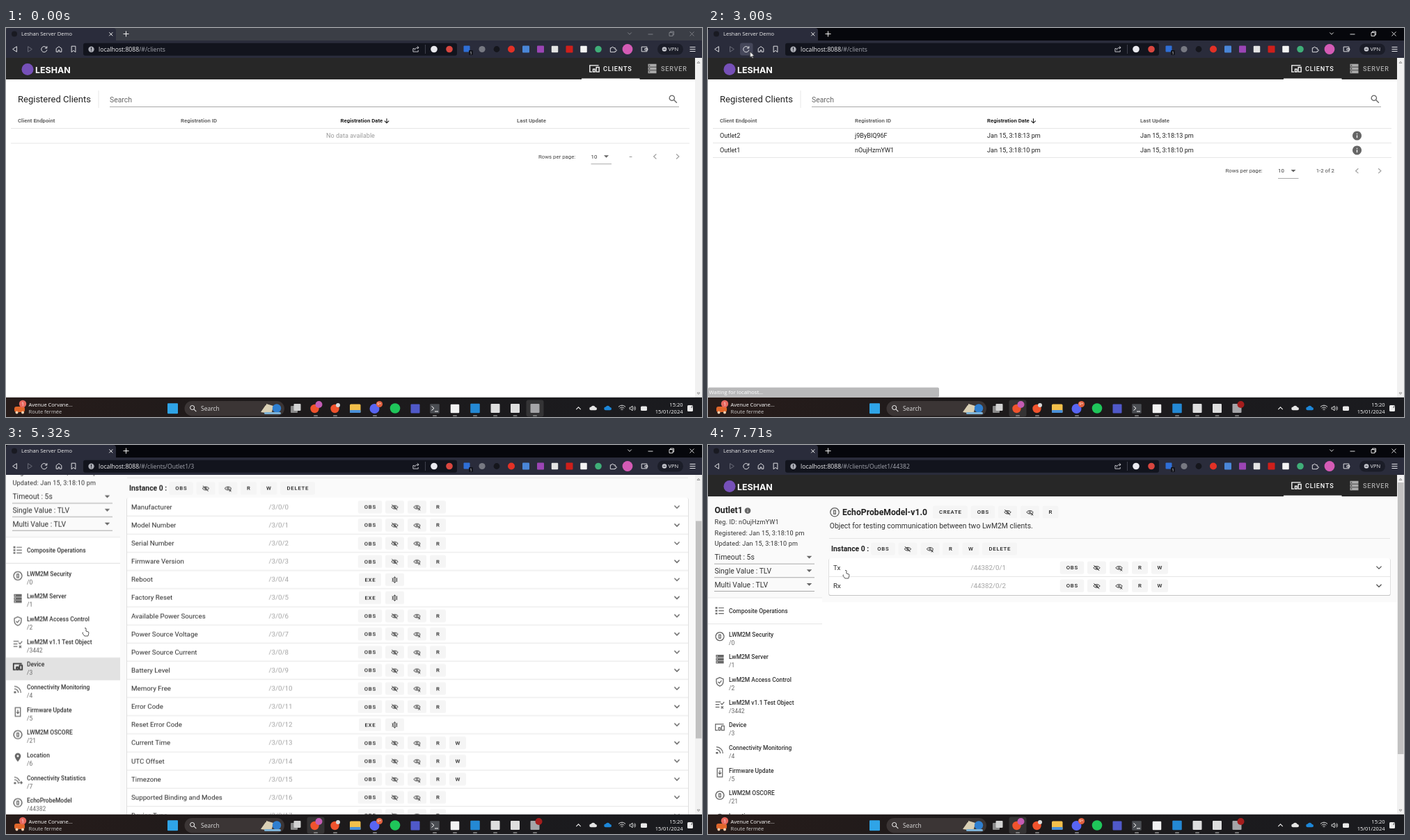
Recreate the animation shown at these times as an HTML page. Size 1000 px wide and 560 px high, loop 8 s.

```html
<!DOCTYPE html>
<html lang="en">
<head>
<meta charset="utf-8">
<title>Server demo</title>
<style>
  html, body { margin: 0; width: 100%; height: 100%; overflow: hidden; background: #fff; }
  svg { display: block; width: 100%; height: 100%; }
  text { white-space: pre; }
</style>
</head>
<body>
<svg id="stage" viewBox="0 0 1000 560">
  <defs>
    <clipPath id="view"><rect y="43" width="990" height="489"/></clipPath>
    <linearGradient id="bar"><stop stop-color="#271c1a"/><stop offset=".4" stop-color="#1d1a1b"/><stop offset="1" stop-color="#1a1b1f"/></linearGradient>
  </defs>
</svg>
<script>
const LOOP = 8000;
const ROBOTO = 'Roboto, sans-serif';
const UI = '"Open Sans", "Noto Sans", sans-serif';
const INK = '#212121', GREY = '#666', PALE = '#a3a3a3', RULE = '#e0e0e0';

let parent = document.getElementById('stage');

// ---- drawing helpers ----
function add(tag, attrs) {
  const node = document.createElementNS('http://www.w3.org/2000/svg', tag);
  for (const key in attrs) node.setAttribute(key, attrs[key]);
  return parent.appendChild(node);
}
function group(draw, attrs = {}) {
  const outer = parent, g = add('g', attrs);
  parent = g;
  draw();
  parent = outer;
  return g;
}
const rect = (x, y, width, height, fill, rx = 0) => add('rect', { x, y, width, height, fill, rx });
const dot = (cx, cy, r, fill) => add('circle', { cx, cy, r, fill });
const square = (x, y, size, fill) => rect(x - size / 2, y - size / 2, size, size, fill, 1);
const hline = (x1, x2, y, fill = RULE) => rect(x1, y - .4, x2 - x1, .8, fill);
const line = (d, stroke, width = 1) =>
  add('path', { d, stroke, fill: 'none', 'stroke-width': width, 'stroke-linejoin': 'round' });

// y is the middle of the capitals
function text(x, y, str, size, fill = INK, { weight = 400, font = ROBOTO, anchor = 'start', spacing = 0 } = {}) {
  const node = add('text', {
    x, y: y + size * .355, fill, 'font-size': size, 'font-family': font,
    'font-weight': weight, 'text-anchor': anchor, 'letter-spacing': spacing
  });
  node.textContent = str;
  return node;
}
const ui = (x, y, str, size, fill = '#fff', more) => text(x, y, str, size, fill, { font: UI, ...more });

const EYE = 'M2 12C5 5.500 19 5.500 22 12 19 18.500 5 18.500 2 12zM12 9.500a2.500 2.500 0 1 0 .01 0';
const STROKED = {
  devices: 'M21 5H2V19H7M9 13h4v6H9zM16 9h6v10h-6z',
  shield: 'M12 2 4 5.500V11c0 5 3.500 9.500 8 11 4.500-1.500 8-6 8-11V5.500zM8 12l3 3 5-6',
  checks: 'M2 6h12M2 12h9M2 18h9M14 9l3 3 5-6M15 16l5 5m0-5-5 5',
  signal: 'M4 5a15 15 0 0 1 15 15M4 11a9 9 0 0 1 9 9M4 18h3v2H4z',
  stats: 'M4 5a15 15 0 0 1 12 9M4 11a9 9 0 0 1 9 9M4 18h3v2H4zM14 18h8m-3-3 3 3-3 3',
  phone: 'M6 2h12v20H6zM12 7v8M8.500 12l3.500 3.500 3.500-3.500',
  zero: 'M12 2.500a9.500 9.500 0 1 0 .01 0M10 8h4v8h-4z',
  list: 'M9 5h13M9 12h13M9 19h13M2 4h3v2H2zM2 11h3v2H2zM2 18h3v2H2z',
  eye: EYE + 'M16 16l6 6m0-6-6 6',
  eyeOff: EYE + 'M3 4l17 17',
  gear: 'M12 5a7 7 0 1 0 .01 0M12 9a3 3 0 1 0 .01 0M12 2v3M12 19v3M3.500 7l2.500 1.500M18 15.500l2.500 1.500M3.500 17l2.500-1.500M18 8.500l2.500-1.500',
  search: 'M9.500 4a5.500 5.500 0 1 0 .01 0M14 14l6 6',
  down: 'M6.500 9l5.500 5.500L17.500 9', left: 'M15 6.500 9 12l6 5.500', right: 'M9 6.500 15 12l-6 5.500', up: 'M6 15l6-6 6 6',
  arrow: 'M12 4v14M5 11.500l7 7 7-7',
  back: 'M17 4v16L5 12z', forward: 'M7 4v16l12-8z',
  reload: 'M19.500 9A8.500 8.500 0 1 0 20 14M20 3v6h-6',
  home: 'M4 10 12 4l8 6v10h-6v-5h-4v5H4z', mark: 'M6 3h12v18l-6-5-6 5z',
  share: 'M8 10H3v10h16v-5M8 15c1-6 5-8 12-8M16 3l5 4-5 4',
  puzzle: 'M4 8h4a3 3 0 1 1 6 0h5v5a3 3 0 1 1 0 5v3H4z', wallet: 'M3 5h16v14H3zM13 10h8v5h-8z',
  wifi: 'M2 9c6-6 14-6 20 0M5.500 13c4-4 9-4 13 0M9 16.500c2-2 4-2 6 0M12 19v1',
  speaker: 'M3 9h4l5-5v16l-5-5H3zM16 8c2 2 2 6 0 8M19 5c4 4 4 10 0 14'
};
const FILLED = {
  server: 'M3 2h18v6H3zM3 9h18v6H3zM3 16h18v6H3zM5 4v2h2V4zM5 11v2h2v-2zM5 18v2h2v-2z',
  pin: 'M12 2a7 7 0 0 0-7 7c0 5 7 13 7 13s7-8 7-13a7 7 0 0 0-7-7m0 4.500a2.500 2.500 0 1 1-.01 0z',
  info: 'M12 2a10 10 0 1 0 .01 0M11 7h2v2h-2zM11 11h2v6h-2z',
  caret: 'M6 9h12l-6 6z',
  cloud: 'M6 19a5 5 0 0 1 0-10 7 7 0 0 1 13 1 4.500 4.500 0 0 1 0 9z'
};
function icon(name, x, y, size, color = GREY, width = 2) {
  const paint = FILLED[name]
    ? { d: FILLED[name], fill: color, 'fill-rule': 'evenodd' }
    : { d: STROKED[name], fill: 'none', stroke: color, 'stroke-width': width };
  const k = size / 24;
  add('path', { ...paint, transform: `translate(${x - size / 2} ${y - size / 2}) scale(${k})` });
}

// ---- timing helpers: keys are [ms, value] ----
function track(node, prop, keys, easing = 'steps(1, end)') {
  const frames = [...keys, [LOOP, keys[keys.length - 1][1]]]
    .map(([t, value]) => ({ offset: t / LOOP, [prop]: value, easing }));
  node.animate(frames, { duration: LOOP, iterations: Infinity });
}
function show(node, from, to = LOOP) {
  const keys = from ? [[0, 0], [from, 1]] : [[0, 1]];
  if (to < LOOP) keys.push([to, 0]);
  track(node, 'opacity', keys);
}
const fade = (node, keys) => track(node, 'opacity', keys, 'linear');

const ACTIVE = 1540, BLANK = 1900, LOADED = 2280, OPEN = 4020, LISTED = 4360, SWITCH = 6080;
const NODE = 'Outlet1', OBJECT = 'EchoProbeModel', OBJECT_ID = '44382';

// ---- page content ----
function header() {
  rect(0, 43, 990, 31, '#272727');
  dot(31, 59.5, 8.5, '#7650b8');
  text(42, 60.3, 'LESHAN', 12.4, '#fff', { weight: 700, font: 'Inter, sans-serif' });
  icon('devices', 845.5, 58.5, 16, '#fff');
  text(858, 58.5, 'CLIENTS', 9.11, '#fff', { weight: 500, spacing: .81 });
  icon('server', 928.5, 58.5, 16, '#aaa');
  text(941, 58.5, 'SERVER', 9.11, '#aaa', { weight: 500, spacing: .81 });
  rect(827, 72.6, 83.5, 1.4, '#fff');
}

function tableHead(cols) {
  ['Client Endpoint', 'Registration ID', 'Registration Date', 'Last Update'].forEach((label, i) =>
    text(cols[i], 133.5, label, 7.81, i === 2 ? INK : GREY, { weight: 700 }));
  icon('arrow', cols[2] + 66.5, 133.8, 11, INK, 2.4);
  hline(7, 982, 144.5);
}
function pager(x, y, range) {
  text(x, y, 'Rows per page:', 7.81, '#444');
  text(x + 75.5, y, '10', 7.81, '#333');
  icon('caret', x + 97.5, y, 14);
  hline(x + 75.5, x + 105, y + 10.8, '#949494');
  text(900, y, range, 7.81, '#444', { anchor: 'end' });
  icon('left', 932.5, y, 15, PALE);
  icon('right', 965, y, 15, PALE);
}
function tablePage() {
  text(17, 102.7, 'Registered Clients', 13.02);
  rect(132.6, 90, .8, 25, RULE);
  text(149, 103, 'Search', 10.42, GREY);
  hline(149, 967, 113.4, '#949494');
  icon('search', 958.5, 102.5, 16);

  show(group(() => {
    tableHead([17, 251, 480.5, 734]);
    text(495, 155, 'No data available', 9.11, '#9b9b9b', { anchor: 'middle' });
    hline(7, 982, 166);
    pager(765, 185, '–');
  }), 0, BLANK);

  show(group(() => {
    show(rect(7, 145, 975, 20.5, '#eee'), 3490, 3560);
    show(rect(7, 166, 975, 20.5, '#eee'), 3560, OPEN);
    const cols = [17, 211, 401, 621];
    tableHead(cols);
    [['Outlet2', 'j9ByBlQ96F', '3:18:13'], [NODE, 'nOujHzmYW1', '3:18:10']].forEach(([name, id, time], i) => {
      const y = 154.6 + i * 21, date = `Jan 15, ${time} pm`;
      [name, id, date, date].forEach((cell, c) => text(cols[c], y, cell, 9.11));
      icon('info', 932.5, y + .4, 15.6);
      hline(7, 982, y + 11);
    });
    pager(743.5, 205.7, '1-2 of 2');
  }), BLANK);

  show(group(() => {
    rect(0, 43, 990, 489, '#fff');
    rect(0, 43, 990, 31, '#272727');
  }), BLANK, LOADED);
}

function button(cx, y, label, width) {
  rect(cx - width / 2, y - 9.1, width, 18.2, '#f5f5f5', 2.6);
  if (STROKED[label]) icon(label, cx, y + .3, 11, INK);
  else text(cx + .35, y, label, 7.81, INK, { weight: 500, spacing: .7, anchor: 'middle' });
}
function buttons(y, labels, centres) {
  const widths = { CREATE: 50, OBS: 34.5, EXE: 32, DELETE: 50, R: 23, W: 24 };
  labels.forEach((label, i) => button(centres[i], y, label, widths[label] || 27));
}
const READ = ['OBS', 'eyeOff', 'eye', 'R'], WRITE = [...READ, 'W'], RUN = ['EXE', 'gear'];
const ROW_X = [523, 558.5, 590.5, 620.5, 649];

function objectPage(symbol, title, about, shift, rows) {
  const pitch = 26.12, top = 163.5, bottom = top + pitch * rows.length;
  rect(164, 74, 826, bottom + 10.5 - 74, '#fafafa');
  icon(symbol, 182, 96.7, 15.6);
  text(193, 96.2, title, 12.19, INK, { weight: 700 });
  buttons(96.5, ['CREATE', ...READ], [289, 336, 371.5, 403.5, 433].map(x => x + shift));
  text(174.8, 116, about, 10.42, '#333');
  hline(174, 980, 134.5);
  text(177, 149.6, 'Instance 0 :', 10.42, INK, { weight: 700 });
  buttons(149.5, [...WRITE, 'DELETE'], [251.5, 287, 319, 348.5, 377.5, 419]);
  rect(173.5, top, 807, bottom - top + 1.2, '#c4c4c4', 2);
  rect(174, top - .4, 806, bottom - top + .6, '#fff', 2);
  rows.forEach(([name, path, labels], i) => {
    const y = top + pitch * (i + .5) - .2;
    if (i) hline(174, 980, top + pitch * i);
    text(180, y, name, 9.766, '#2b2b2b');
    text(377.5, y, path, 9.766, PALE);
    buttons(y + .2, labels, ROW_X);
    icon('down', 964, y + .2, 15.6, '#555');
  });
}

const RESOURCES = ['Manufacturer', 'Model Number', 'Serial Number', 'Firmware Version', 'Reboot', 'Factory Reset',
  'Available Power Sources', 'Power Source Voltage', 'Power Source Current', 'Battery Level', 'Memory Free',
  'Error Code', 'Reset Error Code', 'Current Time', 'UTC Offset', 'Timezone', 'Supported Binding and Modes',
  'Device Type', 'Hardware Version', 'Software Version', 'Battery Status', 'Memory Total', 'ExtDevInfo'];
const deviceRows = RESOURCES.map((name, i) => [name, '/3/0/' + i,
  /^Re|^Factory/.test(name) ? RUN : /Time|UTC/.test(name) ? WRITE : READ]);
const probeRows = ['Tx', 'Rx'].map((name, i) => [name, `/${OBJECT_ID}/0/${i + 1}`, WRITE]);

const OBJECTS = [['LWM2M Security', 0, 'zero'], ['LwM2M Server', 1, 'server'], ['LwM2M Access Control', 2, 'shield'],
  ['LwM2M v1.1 Test Object', 3442, 'checks'], ['Device', 3, 'devices'], ['Connectivity Monitoring', 4, 'signal'],
  ['Firmware Update', 5, 'phone'], ['LWM2M OSCORE', 21, 'zero'], ['Location', 6, 'pin'],
  ['Connectivity Statistics', 7, 'stats'], [OBJECT, OBJECT_ID, 'zero']];

function sidebarTop() {
  rect(0, 74, 164, 146, '#fafafa');
  text(9.4, 93.8, NODE, 12.19, INK, { weight: 700 });
  icon('info', 57, 94.5, 10.4);
  ['Reg. ID: nOujHzmYW1', 'Registered: Jan 15, 3:18:10 pm', 'Updated: Jan 15, 3:18:10 pm'].forEach((str, i) =>
    text(9.4, 110.8 + i * 15.7, str, 9.11, '#333', { spacing: .163 }));
  ['Timeout : 5s', 'Single Value : TLV', 'Multi Value : TLV'].forEach((str, i) => {
    const y = 161.8 + i * 19.7;
    text(9.4, y, str, 10.42, '#333');
    icon('caret', 145.5, y - .3, 15);
    hline(9, 153, y + 9.3, '#949494');
  });
  hline(0, 164, 220);
  icon('list', 17, 238.6, 14);
  text(30, 238.5, 'Composite Operations', 8.46, '#333', { weight: 500 });
  hline(0, 164, 257.5);
}
function sidebarList() {
  const itemY = i => 272.6 + i * 32.67;
  const backdrop = (i, fill) => rect(0, itemY(i) - 10, 164, 32.7, fill);
  rect(0, 627, 164, 200, '#fafafa');
  show(backdrop(4, '#e2e2e2'), 0, SWITCH);
  show(backdrop(10, '#f4f4f4'), 5820, SWITCH);
  show(backdrop(10, '#e2e2e2'), SWITCH);
  show(backdrop(7, '#f4f4f4'), SWITCH, 6450);
  OBJECTS.forEach(([name, id, symbol], i) => {
    icon(symbol, 17, itemY(i) + 3, 15);
    text(30, itemY(i), name, 8.46, '#333', { weight: 500 });
    text(30, itemY(i) + 12, '/' + id, 8.46, GREY);
  });
  show(group(() => icon('devices', 17, itemY(4) + 3, 15, INK)), 0, SWITCH);
  hline(0, 164, 627);
}

rect(0, 43, 1000, 489, '#fff');
group(() => {
  const page = group(() => {
    header();
    show(group(tablePage), 0, OPEN);
    show(group(sidebarTop), OPEN);
    show(group(sidebarList), LISTED);
    show(group(() => objectPage('devices', 'Device-v1.2',
      'This LwM2M Object provides a range of device related information which can be queried by the LwM2M Server, and a device reboot and factory reset function.',
      0, deviceRows)), LISTED, SWITCH);
    show(group(() => objectPage('zero', OBJECT + '-v1.0',
      'Object for testing communication between two LwM2M clients.', 59, probeRows)), SWITCH);
  });
  const scroll = [[0, 0], [5180, 0], [5280, 60], [5400, 140], [5520, 196], [SWITCH, 196], [SWITCH, 95],
    [6790, 95], [6890, 38.5], [7040, 0]];
  track(page, 'transform', scroll.map(([t, y]) => [t, `translateY(${-y}px)`]), 'linear');
}, { 'clip-path': 'url(#view)' });

// ---- scrollbar ----
rect(990, 43, 10, 489, '#f1f1f1');
line('M993 50.500l2-2.500 2 2.500z', '#8a8a8a', .8);
line('M993 525l2 2.500 2-2.500z', '#8a8a8a', .8);
const thumb = (height, from, to, keys) => {
  const node = rect(991, 54, 8.5, height, '#c1c1c1');
  show(node, from, to);
  track(node, 'transform', keys.map(([t, y]) => [t, `translateY(${y}px)`]), 'linear');
};
thumb(313, LISTED, SWITCH, [[0, 0], [5180, 0], [5280, 38], [5400, 89], [5520, 125]]);
thumb(391, SWITCH, LOOP, [[0, 76], [6790, 76], [6890, 31], [7040, 0]]);

// ---- status bubbles ----
const bubble = (width, str) => group(() => {
  rect(0, 517.6, width, 14, '#0b0b10', 2);
  ui(1.5, 524.8, str, 7.5);
});
fade(bubble(332, 'Waiting for localhost...'), [[0, 0], [1610, 0], [1680, 1], [2890, 1], [3045, 0]]);
show(bubble(141, `localhost:8088/#/clients/${NODE}/${OBJECT_ID}`), 5820, SWITCH);
fade(bubble(128, `localhost:8088/#/clients/${NODE}/21`), [[0, 0], [SWITCH, 0], [SWITCH, 1], [6820, 1], [6960, 0]]);

// ---- browser frame ----
function captionButtons(color) {
  icon('down', 896, 8, 12, color, 1.8);
  line('M922.500 9h7M953 6.500h5v5h-5zM954.500 6.500V5h5v5H958M982.500 5.500l6 6m0-6-6 6', color, .9);
}
rect(0, 0, 1000, 19, '#06070c');
captionButtons('#f2f2f2');
show(group(() => {
  rect(0, 0, 1000, 19, '#3b3e46');
  captionButtons('#85878d');
}), 0, ACTIVE);
rect(0, 0, 158, 22, '#2a2c3b', 4);
rect(0, 18, 1000, 25, '#2a2c3b');
dot(12, 8.5, 4, '#191a22');
ui(22, 8.8, 'Leshan Server Demo', 7.55, '#eee');
line('M148.300 6.300l5 5m0-5-5 5M168.500 8.500h8m-4-4v8', '#f0f0f0', 1);

show(rect(46, 21.5, 18.5, 18, '#45475a', 3), 1190, 3210);
[['back', 13], ['forward', 34], ['reload', 55], ['home', 76], ['mark', 97]].forEach(([name, x]) =>
  icon(name, x, 30.5, 11.5, name === 'forward' ? '#6d6f7c' : '#e6e6ea'));
rect(111, 21.8, 537, 18, '#12141d', 3);
dot(122.5, 30.7, 4.2, '#a9abb3');
line('M122.500 28v3.500m0 1v1', '#12141d', 1);
const address = path => group(() => {
  const node = ui(133, 30.7, 'localhost:8088', 8.65, '#f0f0f2');
  const rest = node.appendChild(document.createElementNS(node.namespaceURI, 'tspan'));
  rest.setAttribute('fill', '#a5a7b0');
  rest.textContent = '/#/clients' + path;
});
show(address(''), 0, OPEN);
show(address(`/${NODE}/3`), OPEN, SWITCH);
show(address(`/${NODE}/${OBJECT_ID}`), SWITCH);
icon('share', 589, 30.5, 11, '#d0d0d6');
rect(602, 24, .8, 13, '#4a4c58');
dot(615, 30.5, 4.8, '#e9e9ee');
dot(637, 30.5, 4.8, '#d8463f');
square(662, 30, 9, '#2f6fd6');
rect(665, 32, 6, 7, '#15161e', 1);
ui(668, 35.5, '1', 6, '#fff', { anchor: 'middle' });
dot(684, 30.5, 4.6, '#777982');
dot(705, 30.5, 4.4, '#15161c');
dot(726, 30.5, 5, '#e23126');
square(747, 30.5, 10, '#4a86d8');
square(768, 30.5, 10, '#9b45b5');
square(788.5, 30.5, 9.5, '#e4e4e4');
square(809.5, 30.5, 10, '#cf1f1b');
square(830, 30.5, 9.5, '#f4f4f4');
dot(851, 30.5, 4.8, '#3fae78');
icon('puzzle', 872, 30.5, 11, '#e6e6ea');
dot(893, 30.5, 7.4, '#d45bb5');
icon('wallet', 917.500, 30.5, 11.5, '#e6e6ea');
rect(936, 22.500, 37, 16, '#1b1d28', 8);
dot(946, 30.5, 3.3, '#c4c5cc');
hline(944.4, 947.6, 30.5, '#1b1d28');
ui(951.5, 30.7, 'VPN', 7.5, '#f0f0f2');
line('M982.500 27.500h8m-8 3h8m-8 3h8', '#e6e6ea', 1);

// ---- taskbar ----
rect(0, 531.8, 1000, 28.2, 'url(#bar)');
rect(12, 545, 15, 8, '#e0662a', 3);
dot(15.5, 553.5, 2, '#f3d0b0');
dot(24, 553.5, 2, '#f3d0b0');
dot(24, 541, 5.2, '#e8685f');
ui(24, 541.2, '1', 7, '#fff', { anchor: 'middle' });
ui(32.5, 542.2, 'Avenue Corvane...', 7.5);
ui(32.5, 552.6, 'Route fermée', 7.5, '#ccc');
square(239.5, 547.7, 15, '#2fa4e7');
rect(256.5, 537, 143.5, 21.5, '#3b3535', 10.7);
icon('search', 269, 547.8, 13, '#e8e8e8');
ui(280, 548, 'Search', 8.5, '#ddd');
add('path', { d: 'M366 553l7-10 10 2-3 10zM374 541l10 3-2 9-9-2z', fill: '#d9cfb4' });
dot(389, 547.5, 6.2, '#2f7fd0');
rect(371, 553, 24, 3, '#7fb4d8', 1.5);

const focus = x => rect(x - 12.5, 535.5, 25, 24, '#ffffff1c', 3);
show(focus(445), ACTIVE);
show(focus(760), 0, ACTIVE);
square(414, 549, 10, '#8a8a8a');
square(418.5, 546, 10, '#d2d2d2');
dot(443.5, 548, 6.2, '#f0532d');
dot(449.5, 542, 5, '#c45cb4');
dot(472.5, 548, 6.2, '#f0532d');
dot(477, 543, 3, '#d8d8d8');
rect(494, 541.5, 15.5, 12.5, '#f3c04b', 1.5);
rect(494, 550, 15.5, 4, '#4a90d9', 1);
dot(529.5, 548, 7, '#5865f2');
dot(536.500, 541.5, 4.6, '#e0603f');
ui(536.300, 541.6, '9+', 5.2, '#fff', { anchor: 'middle' });
dot(559, 547.5, 7.3, '#1fc65a');
square(588, 548, 13, '#5059c9');
square(616, 548, 13.5, '#4a4d52');
line('M611.500 544.500l3.500 3-3.500 3M616 552h5', '#fff', 1);
square(645, 548, 12.5, '#f2f2f2');
square(674, 547.5, 13.5, '#2489d4');
square(703, 547.5, 13, '#dedede');
square(731.500, 547.5, 13, '#dedede');
square(760, 547.5, 13, '#a5a5a8');
[445, 473, 530, 616, 645, 674, 703, 731.5, 760].forEach(x => rect(x - 3, 557.6, 6, 1.4, '#8d8d8d', .7));
show(dot(765.5, 542, 5, '#a51d1d'), 190);

icon('up', 822.500, 547.5, 13, '#eee');
icon('cloud', 843.5, 547, 11.5, '#e4e4e4');
icon('cloud', 864.500, 547, 11.5, '#1d87d8');
icon('wifi', 885, 547, 12, '#eee');
icon('speaker', 900, 547.5, 10.5, '#eee');
rect(912, 544.5, 9, 6.5, '#e8e8e8', 1.5);
ui(972.5, 542, '15:20', 7.5, '#fff', { anchor: 'end' });
ui(972.5, 552.5, '15/01/2024', 7.5, '#fff', { anchor: 'end' });
rect(979, 543, 8, 9, '#ececec', 1.5);
ui(985.500, 545, 'z', 6, '#1a1b1f', { anchor: 'middle' });

// ---- pointer ----
const pointer = group(() => {
  const arrow = add('path', {
    d: 'M0 0V8.500l2-1.800 1.300 3 1.300-.6L3.300 6.200H6z', fill: '#fff', stroke: '#111', 'stroke-width': .6
  });
  const hand = add('path', {
    d: 'M-1 1Q0-.600 1 1V5L4.500 6Q5 6.500 4.800 8.500L3.800 12H-1.200L-4 8.200Q-4-1+7.500L-3.600 7-1 8.300z'.replace('Q-4-1+7.500L-3.600 7', 'Q-4.400 6.800-3 7'),
    fill: '#fff', stroke: '#111', 'stroke-width': .7, 'stroke-linejoin': 'round'
  });
  track(arrow, 'opacity', [[0, 1], [3490, 0], [6400, 1], [7500, 0]]);
  track(hand, 'opacity', [[0, 0], [3490, 1], [6400, 0], [7500, 1]]);
});
const route = [[0, 758, 548], [460, 758, 548], [700, 480, 330], [930, 120, 60], [1050, 6, 10], [1260, 58, 31],
  [1330, 59, 32], [2280, 59, 32], [2600, 60.5, 34], [3140, 60.5, 34], [3500, 92, 150], [3880, 105, 180],
  [3950, 106, 184], [4090, 114, 263], [5520, 114, 263], [5880, 57.5, 406], [6300, 57.5, 406], [6750, 388, 367],
  [6950, 388, 367], [7400, 260, 220], [7640, 203, 181], [7700, 198, 180]];
track(pointer, 'transform', route.map(([t, x, y]) => [t, `translate(${x}px, ${y}px)`]), 'linear');
show(pointer, 460);
</script>
</body>
</html>
```
